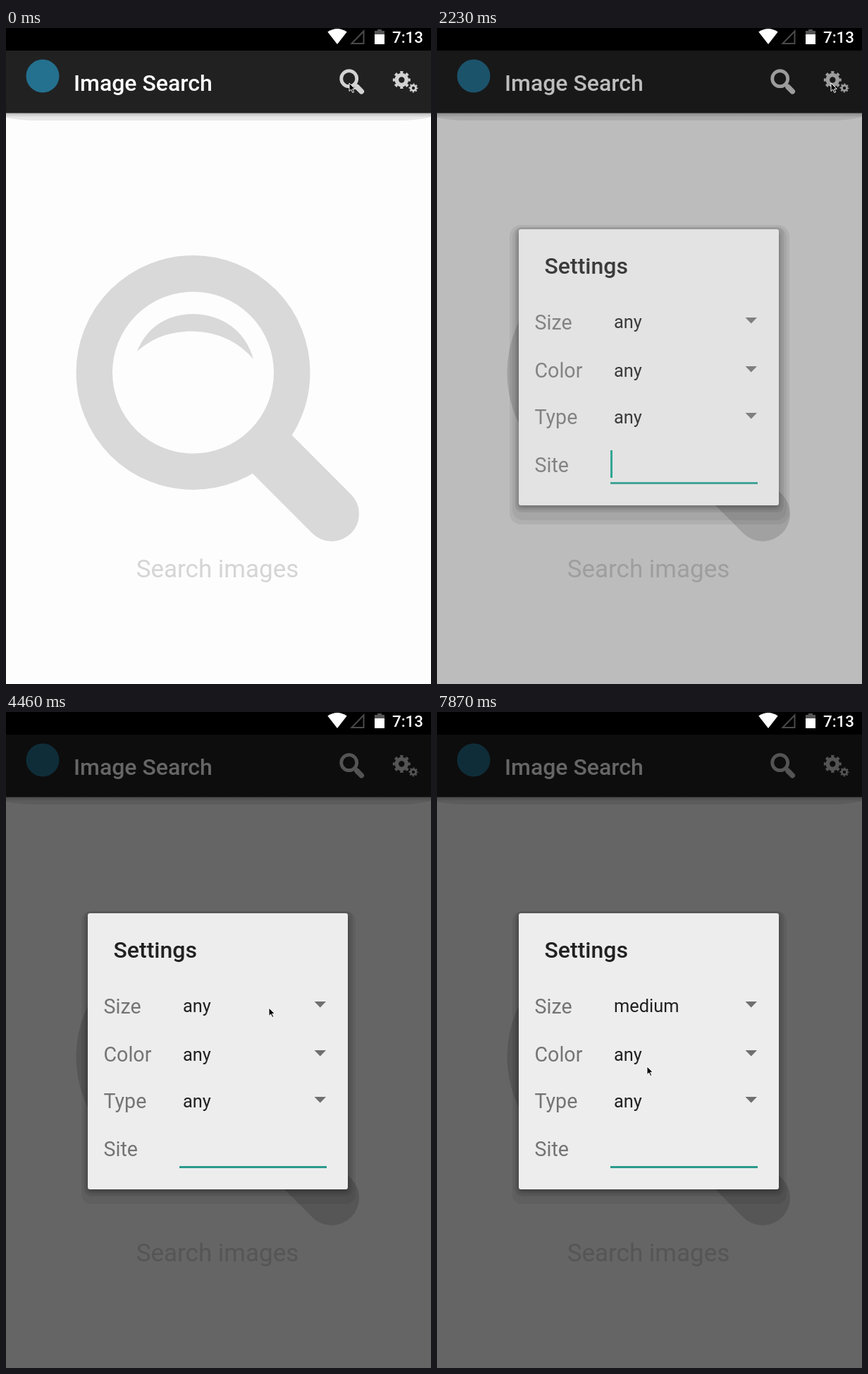
Write an HTML page that moves like this. It is 603 px wide and 929 px high and loops after 8 s.

```html
<!DOCTYPE html>
<html lang="en">
<head>
<meta charset="utf-8">
<title>Image search settings</title>
<style>
  html, body { margin: 0; width: 100%; height: 100%; overflow: hidden; background: #fdfdfd; }
  svg { display: block; width: 603px; height: 929px; font-family: Roboto, sans-serif; }
  .medium { font-weight: 500; }
  .label { font-size: 28.6px; fill: #747474; }
  .value { font-size: 25.4px; fill: #212121; }

  /* Every part holds its state until the next key. */
  .step { animation: 8s step-end infinite; }
  #pointer { animation-name: pointer; }
  #ripple { animation-name: ripple; }
  #dim { animation-name: dim; }
  #dialog { animation-name: dialog; }
  #panel { animation-name: panel; }
  #content { animation-name: content; }
  #wide { animation-name: wide; }
  #caret { animation-name: caret; }
  #popup { animation-name: popup; }
  #before { animation-name: before; }
  #after { animation-name: after; }

  @keyframes pointer {
    0% { transform: translate(487px, 78px); }
    3.625% { transform: translate(504px, 78px); }
    5.5% { transform: translate(531px, 78px); }
    7.375% { transform: translate(548px, 78px); }
    18.625% { transform: translate(554px, 78px); }
    20.375% { transform: translate(559px, 78px); }
    31.5% { transform: translate(531px, 130px); }
    33.375% { transform: translate(458px, 264px); }
    35.25% { transform: translate(391px, 385px); }
    37.125% { transform: translate(373px, 419px); }
    68.75% { transform: translate(365px, 428px); }
    70.5% { transform: translate(342px, 452px); }
    72.375% { transform: translate(316px, 478px); }
    74.25% { transform: translate(301px, 493px); }
    76% { transform: translate(298px, 498px); }
    77.875% { transform: translate(298px, 503px); }
    79.75% { transform: translate(298px, 508px); }
    81.625% { transform: translate(298px, 512px); }
    98.375%, 100% { transform: translate(298px, 502px); }
  }
  @keyframes ripple { 0%, 27.875%, 100% { opacity: 0; } 26% { opacity: 1; } }
  @keyframes dim { 0% { opacity: 0; } 27.875% { opacity: .26; } 29.75%, 100% { opacity: .6; } }
  @keyframes dialog { 0% { opacity: 0; } 27.875%, 100% { opacity: 1; } }
  @keyframes panel { 0% { fill: #e3e3e3; } 29.75%, 100% { fill: #ededed; } }
  @keyframes content { 0% { opacity: .87; } 29.75%, 100% { opacity: 1; } }
  @keyframes wide { 0% { opacity: 1; } 29.75%, 100% { opacity: 0; } }
  @keyframes caret {
    0%, 37.125%, 50.125%, 63.125% { opacity: 1; }
    31.5%, 44.5%, 55.75%, 92.75%, 100% { opacity: 0; }
  }
  @keyframes popup {
    0%, 89%, 100% { opacity: 0; }
    65%, 87.125% { opacity: .5; }
    66.875% { opacity: 1; }
  }
  @keyframes before { 0% { opacity: 1; } 87.125%, 100% { opacity: 0; } }
  @keyframes after { 0% { opacity: 0; } 87.125%, 100% { opacity: 1; } }
</style>
</head>
<body>
<svg viewBox="0 0 603 929">
  <defs>
    <linearGradient id="fade" x2="0" y2="1">
      <stop stop-color="#b9b9b9"/>
      <stop offset="1" stop-color="#e3e3e3"/>
    </linearGradient>
    <filter id="soft" x="-10%" y="-10%" width="120%" height="120%">
      <feGaussianBlur stdDeviation="3"/>
    </filter>
    <clipPath id="bar"><path d="M0 32H603V120.500H0Z"/></clipPath>
    <g id="gear" fill="none" stroke="#d2d2d2">
      <circle r="7" stroke-width="5.600"/>
      <circle r="10.800" stroke-width="3.400" pathLength="16" stroke-dasharray="1" stroke-dashoffset=".5"/>
    </g>
    <path id="arrow" d="M0 0H16.500L8.250 8.500Z" fill="#6f6f6f"/>
  </defs>

  <rect width="603" height="929" fill="#fdfdfd"/>

  <!-- Empty state -->
  <g fill="none" stroke="#d9d9d9">
    <circle cx="265.500" cy="488" r="140.250" stroke-width="51.500"/>
    <path d="M379 605L462 688" stroke-width="78" stroke-linecap="round"/>
  </g>
  <path d="M186 458C200 422 231 405 265 405C308 405 341 431 351 469C329 443 297 429 261 429.500C230 430 206 440 186 458Z" fill="#d9d9d9"/>
  <text x="300" y="778" font-size="35" fill="#d5d5d5" text-anchor="middle">Search images</text>

  <!-- Action bar -->
  <path d="M0 120H603V126Q583 131 558 131H45Q20 131 0 127Z" fill="#e8e8e8"/>
  <rect y="120" width="603" height="6" fill="url(#fade)"/>
  <rect y="32" width="603" height="88.500" fill="#212121"/>
  <g clip-path="url(#bar)">
    <circle id="ripple" class="step" cx="567" cy="76" r="54" fill="#303030"/>
  </g>
  <circle cx="52" cy="68" r="23.500" fill="#24708f"/>
  <text class="medium" x="96" y="89" font-size="32" fill="#fff">Image Search</text>
  <g fill="none" stroke="#d2d2d2">
    <circle cx="486.700" cy="71.700" r="11" stroke-width="4.800"/>
    <path d="M495 80L497 82" stroke-width="5"/>
    <path d="M498 83.500L504.300 89.800" stroke-width="7.500" stroke-linecap="round"/>
  </g>
  <use href="#gear" x="561.300" y="73.500"/>
  <use href="#gear" transform="translate(578 85) scale(.52)"/>

  <rect id="dim" class="step" y="32" width="603" height="897"/>

  <!-- Status bar -->
  <rect width="603" height="32"/>
  <path d="M470 23L456.300 5.500Q470 -3.500 483.700 5.500Z" fill="#fff"/>
  <path d="M490.500 22H507.500V4.500Z" fill="none" stroke="#4a4a4a" stroke-width="2"/>
  <path d="M523 4H527V2H533V4H537V23H523Z" fill="#555"/>
  <path d="M523 9H537V23H523Z" fill="#fff"/>
  <text class="medium" x="548" y="20.500" font-size="22.300" fill="#fff">7:13</text>

  <!-- Settings dialog -->
  <g id="dialog" class="step">
    <g fill-opacity=".06">
      <rect id="wide" class="step" x="103" y="279" width="397" height="424" rx="16"/>
      <rect x="107" y="282" width="389" height="415" rx="14"/>
      <rect x="111" y="282" width="381" height="404" rx="9"/>
    </g>
    <rect x="115" y="288" width="371" height="392" rx="4" opacity=".28" filter="url(#soft)"/>
    <rect id="panel" class="step" x="116" y="285" width="369" height="391" rx="3"/>
    <g id="content" class="step">
      <text class="medium" x="152.500" y="348" font-size="32" fill="#212121">Settings</text>
      <g class="label">
        <text x="138.500" y="427">Size</text>
        <text x="138.500" y="495">Color</text>
        <text x="138.500" y="561">Type</text>
        <text x="138.500" y="629">Site</text>
      </g>
      <g class="value">
        <text id="before" class="step" x="251" y="425">any</text>
        <text id="after" class="step" x="251" y="425">medium</text>
        <text x="251" y="494">any</text>
        <text x="251" y="560">any</text>
      </g>
      <use href="#arrow" x="437.500" y="410"/>
      <use href="#arrow" x="437.500" y="479"/>
      <use href="#arrow" x="437.500" y="545"/>
      <rect x="246" y="643" width="209" height="3" fill="#2a9a8c"/>
      <rect id="caret" class="step" x="246" y="598" width="3" height="39" fill="#159c89"/>
    </g>
  </g>

  <!-- Size choices -->
  <g id="popup" class="step">
    <g fill-opacity=".028">
      <rect x="227" y="388" width="225" height="234" rx="15"/>
      <rect x="232" y="391" width="215" height="225" rx="11"/>
    </g>
    <rect x="239" y="399" width="197" height="203" rx="3" opacity=".3" filter="url(#soft)"/>
    <rect x="239" y="396" width="197" height="203" rx="2" fill="#ebebeb"/>
    <g class="value">
      <text x="251" y="423">any</text>
      <text x="251" y="457">icon</text>
      <text x="251" y="491">small</text>
      <text x="251" y="525">medium</text>
      <text x="251" y="558.500">large</text>
      <text x="251" y="592">xlarge</text>
    </g>
  </g>

  <path id="pointer" class="step" d="M0 0V11.500L2.700 9L4.800 13.500L6.700 12.600L4.700 8.300H8.300Z" stroke="#fff"/>
</svg>
</body>
</html>
```
